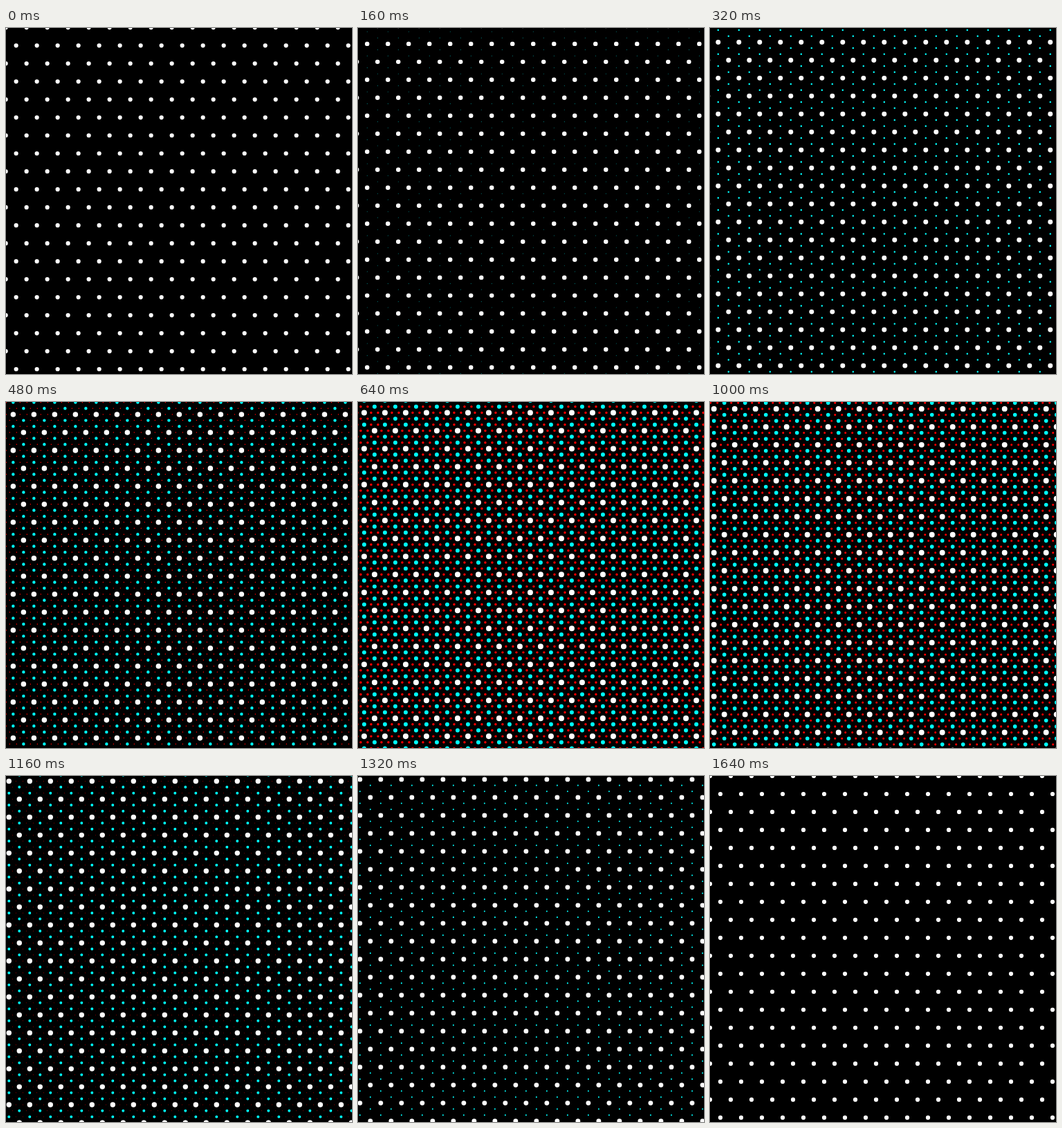
Write an HTML page with a canvas that moves like this. It is 500 px wide and 500 px high and loops after 1.68 s.

```html
<!DOCTYPE html>
<html lang="en">
<head>
<meta charset="utf-8">
<title>Drifting dot lattice</title>
<style>
html, body { margin: 0; height: 100%; overflow: hidden; background: #000; }
canvas { display: block; }
</style>
</head>
<body>
<canvas id="stage" width="500" height="500"></canvas>
<script>
const ctx = document.getElementById('stage').getContext('2d');
const SIZE = 500, STEPS = 42, STEP_MS = 40;
const GAP = 30, ROW = GAP * Math.sqrt(3) / 2;

// Offsets of each dot family inside one lattice cell
const whiteDots = [[0, 0]];
const cyanDots = [[GAP / 2, ROW / 3], [GAP / 2, -ROW / 3]];
const redDots = [[10, 0], [20, 0], [5, ROW / 3], [-5, ROW / 3], [10, ROW * 2 / 3], [-10, ROW * 2 / 3]];

function drawLattice(offsets, color, diameter, dx, dy) {
  if (diameter <= 0) return;
  ctx.fillStyle = color;
  ctx.beginPath();
  for (let row = -2; row * ROW < SIZE + 2 * ROW; row++) {
    const shift = row & 1 ? GAP / 2 : 0;
    for (let col = -2; col * GAP < SIZE + 2 * GAP; col++) {
      for (const [ox, oy] of offsets) {
        const x = col * GAP + shift + dx + ox;
        const y = row * ROW + dy + oy;
        ctx.moveTo(x + diameter / 2, y);
        ctx.arc(x, y, diameter / 2, 0, Math.PI * 2);
      }
    }
  }
  ctx.fill();
}

function draw(now) {
  const step = Math.floor(now / STEP_MS) % STEPS;
  const phase = (step + 1) / STEPS;
  const wave = -Math.cos(phase * Math.PI * 2);
  const dx = -phase * GAP / 2, dy = -phase * ROW;

  ctx.fillStyle = '#000';
  ctx.fillRect(0, 0, SIZE, SIZE);
  drawLattice(redDots, '#f00', 4.2 * wave, dx, dy);
  drawLattice(cyanDots, '#0ff', 3.25 * (1 + wave), dx, dy);
  drawLattice(whiteDots, '#fff', 7.2 + wave, dx, dy);
}

const start = performance.now();
function loop() {
  draw(performance.now() - start);
  requestAnimationFrame(loop);
}
loop();
</script>
</body>
</html>
```
